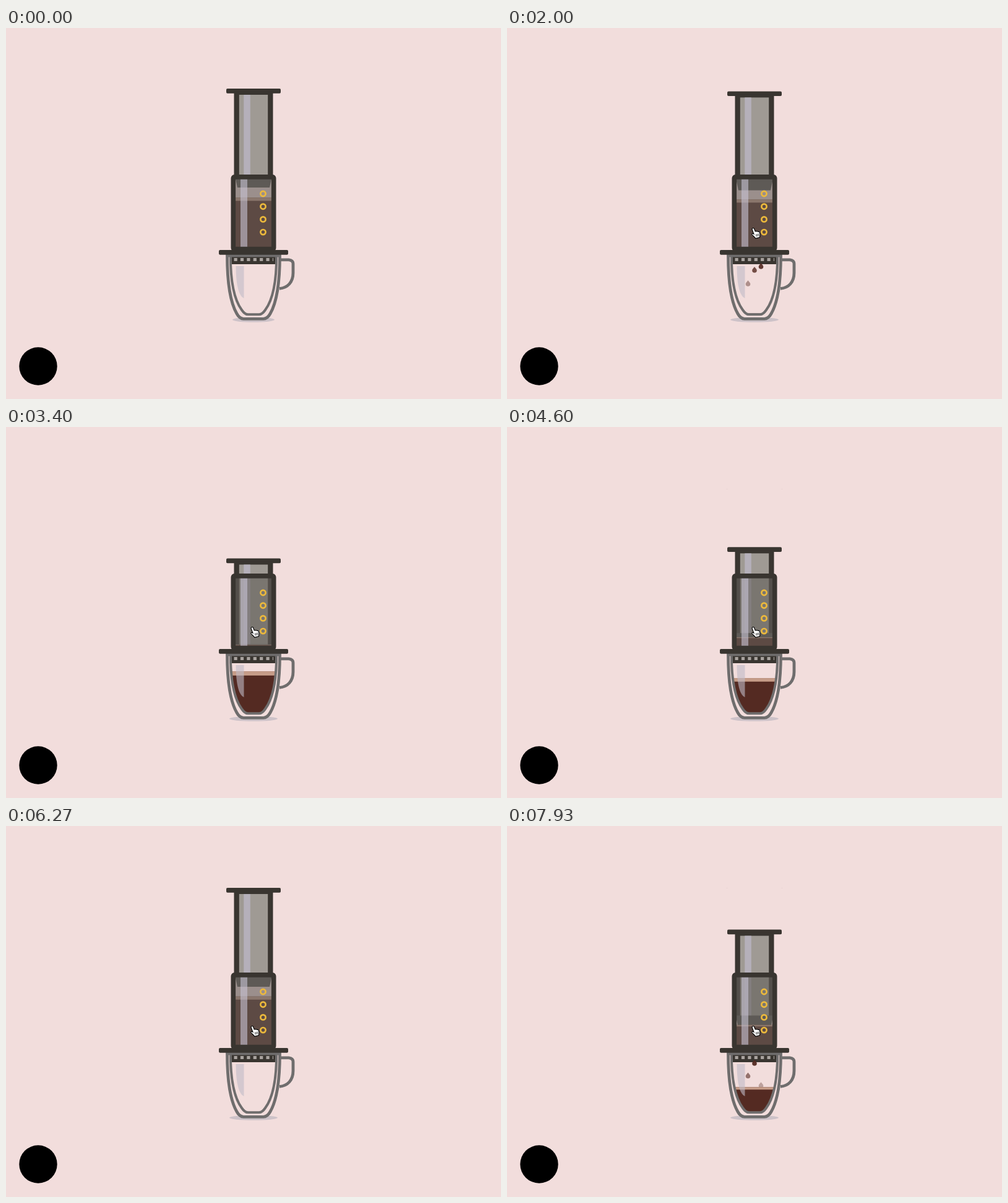
These frames come from a looping animation (800x600 px, 8000 ms). An HTML page:

```html
<!DOCTYPE html>
<html lang="en">
<head>
<meta charset="utf-8">
<title>Coffee press</title>
<style>
  html, body { margin: 0; width: 100%; height: 100%; overflow: hidden; background: #f2dddc; }
  svg { display: block; width: 800px; height: 600px; }
</style>
</head>
<body>
<svg viewBox="0 0 800 600">
  <defs>
    <clipPath id="chamberClip"><rect x="371" y="241" width="58" height="118"/></clipPath>
    <clipPath id="tubeClip"><rect x="340" y="0" width="120" height="241"/></clipPath>
    <path id="cupInside" d="M362.800 368C362.800 410 369 440 381 456Q386 463.300 391 463.300H409Q414 463.300 419 456C431 440 437.200 410 437.200 368"/>
    <clipPath id="cupClip"><use href="#cupInside"/></clipPath>
    <path id="drop" d="M0-5C1.6-2.8 3.8-1.4 3.8.8A3.8 3.8 0 0 1-3.8.8C-3.8-1.4-1.6-2.8 0-5Z" fill="#542a22"/>
    <g id="plunger">
      <rect x="356" width="88" height="7.7" rx="2" fill="#393530"/>
      <rect x="368.5" y="5" width="63" height="135" fill="#393530"/>
      <rect x="376.8" y="10" width="46.4" height="130" fill="#9f9a94"/>
      <rect x="384.3" y="10" width="10.5" height="130" fill="#b5b0ba"/>
      <path d="M371 139h58v7l-3 14h-52l-3-14z" fill="#565450"/>
    </g>
  </defs>

  <circle cx="52" cy="547" r="30.7"/>
  <ellipse id="shadow" cx="400" cy="471.8" rx="39" ry="4" fill="#cdc2c8"/>

  <g clip-path="url(#tubeClip)"><use class="press" href="#plunger"/></g>
  <g clip-path="url(#chamberClip)">
    <use class="press" href="#plunger"/>
    <g id="brew">
      <rect x="371" y="-86" width="58" height="86" fill="#542a22"/>
      <rect x="371" y="-86" width="58" height="5.2" fill="#c69c88"/>
    </g>
    <rect x="371" y="241" width="58" height="118" fill="#65605a" fill-opacity=".61"/>
    <rect x="379" y="241" width="11" height="118" fill="#c8c4d4" fill-opacity=".6"/>
  </g>
  <rect x="367.3" y="240.9" width="65.4" height="116.6" rx="2" fill="none" stroke="#393530" stroke-width="7.6"/>
  <g id="rings" fill="none" stroke="#ecb93c" stroke-width="2.7"></g>

  <rect x="363" y="365" width="74" height="17" fill="#393530"/>
  <path d="M368.5 374.5H432" stroke="#a9a39f" stroke-width="5" stroke-dasharray="5.2 5.2"/>
  <g id="drops"></g>
  <g clip-path="url(#cupClip)">
    <g id="coffee">
      <rect x="360" y="-76" width="80" height="76" fill="#542a22"/>
      <rect x="360" y="-76" width="80" height="7.6" fill="#c69c88"/>
    </g>
  </g>
  <path d="M371.5 385H384.5V437C375 433 371.5 411 371.5 385Z" fill="#bfbac6" fill-opacity=".6"/>
  <g fill="none" stroke="#6f6d6d" stroke-width="4.8">
    <path d="M357.500 368C357.500 412 362 443 373 462Q377.500 470.300 384 470.300H416Q422.500 470.300 427 462C438 443 442.500 412 442.500 368Z"/>
    <use href="#cupInside" stroke-width="4"/>
    <path d="M443 374.800H457Q464 375.800 464 381V396C464 411 455 420.500 442 421.300"/>
  </g>
  <rect x="344" y="359" width="112" height="7.8" rx="2" fill="#393530"/>

  <g id="cursor">
    <path d="M2 .7C3.400.1 4.300 1 4.700 2L6.200 6C7 5.200 8 5.400 8.500 6.200C9.300 5.500 10.300 5.700 10.800 6.500C12 6 12.900 6.700 13.200 7.700L14 11C14.200 12.700 13.600 13.700 13.500 15.500L6.700 17.300C5.700 15.200 3.500 14 1.300 11.500C.3 10.300 1.500 9 2.800 9.600L4 10.400L1.300 3.200C.9 2.100 1 1.200 2 .7Z"
      fill="#fff" stroke="#000" stroke-width="1.100"/>
    <path d="M7.300 10.500l1 3.800M9.300 10l1 3.800M11.300 9.500l1 3.800" stroke="#000" stroke-width=".8"/>
  </g>
</svg>
<script>
  const LOOP = 8000, TRAVEL = 126, PRESS_TIME = 2000;
  const PRESSES = [1825, 6885];
  const RELEASE = { start: 3780, time: 1780 };
  // column, period and delay of each falling drop
  const DROPS = [[389.5, 179, 13], [400, 183, 79], [410.5, 188, 108]];

  const $ = id => document.getElementById(id);
  const clamp = v => Math.min(1, Math.max(0, v));
  const easeInOut = u => (1 - Math.cos(Math.PI * clamp(u))) / 2;
  const mix = (a, b, u) => a + (b - a) * u;

  function add(parent, tag, attrs) {
    const el = document.createElementNS('http://www.w3.org/2000/svg', tag);
    for (const key in attrs) el.setAttribute(key, attrs[key]);
    return parent.appendChild(el);
  }

  for (let i = 0; i < 4; i++) add($('rings'), 'circle', { cx: 415.5, cy: 268 + i * 20.7, r: 4.1 });
  const drops = DROPS.map(() => add($('drops'), 'use', { href: '#drop' }));
  const plungers = document.querySelectorAll('.press');

  // plunger offset in pixels from its resting place
  function plungerOffset(t) {
    if (t < 450) return mix(-2, -3.3, easeInOut(t / 450));
    if (t < PRESSES[0]) return mix(-3.3, 0, easeInOut((t - 450) / 1050));
    if (t < RELEASE.start) return TRAVEL * easeInOut((t - PRESSES[0]) / PRESS_TIME);
    if (t < PRESSES[1]) return TRAVEL * Math.cos(Math.PI / 2 * clamp((t - RELEASE.start) / RELEASE.time));
    return TRAVEL * easeInOut((t - PRESSES[1]) / PRESS_TIME);
  }

  function drawDrops(t) {
    const since = t - (t < PRESSES[1] ? PRESSES[0] : PRESSES[1]);
    DROPS.forEach(([x, period, delay], i) => {
      const age = since - delay;
      const visible = age >= 0 && since < 1500;
      const fall = visible ? (age % period / period) ** 2 : 0;
      drops[i].setAttribute('transform', `translate(${x} ${380 + 40 * fall})`);
      drops[i].setAttribute('opacity', visible ? 1 - 0.68 * fall : 0);
    });
  }

  function draw(t) {
    const offset = plungerOffset(t), pressed = offset / TRAVEL;
    plungers.forEach(el => el.setAttribute('transform', `translate(0 ${100 + offset})`));
    $('brew').setAttribute('transform', `translate(0 361.6) scale(1 ${1 - pressed})`);
    $('coffee').setAttribute('transform', `translate(0 463) scale(1 ${Math.max(0, pressed)})`);
    $('shadow').setAttribute('rx', mix(34, 39, easeInOut(t / 800)));
    drawDrops(t);

    const reach = easeInOut((t - 70) / 800);
    $('cursor').setAttribute('transform', `translate(${mix(315, 395, reach)} ${mix(531, 323, reach)})`);
    $('cursor').setAttribute('visibility', t < 70 ? 'hidden' : 'visible');
  }

  const begin = performance.now();
  function tick() {
    draw((performance.now() - begin) % LOOP);
    requestAnimationFrame(tick);
  }
  tick();
</script>
</body>
</html>
```
